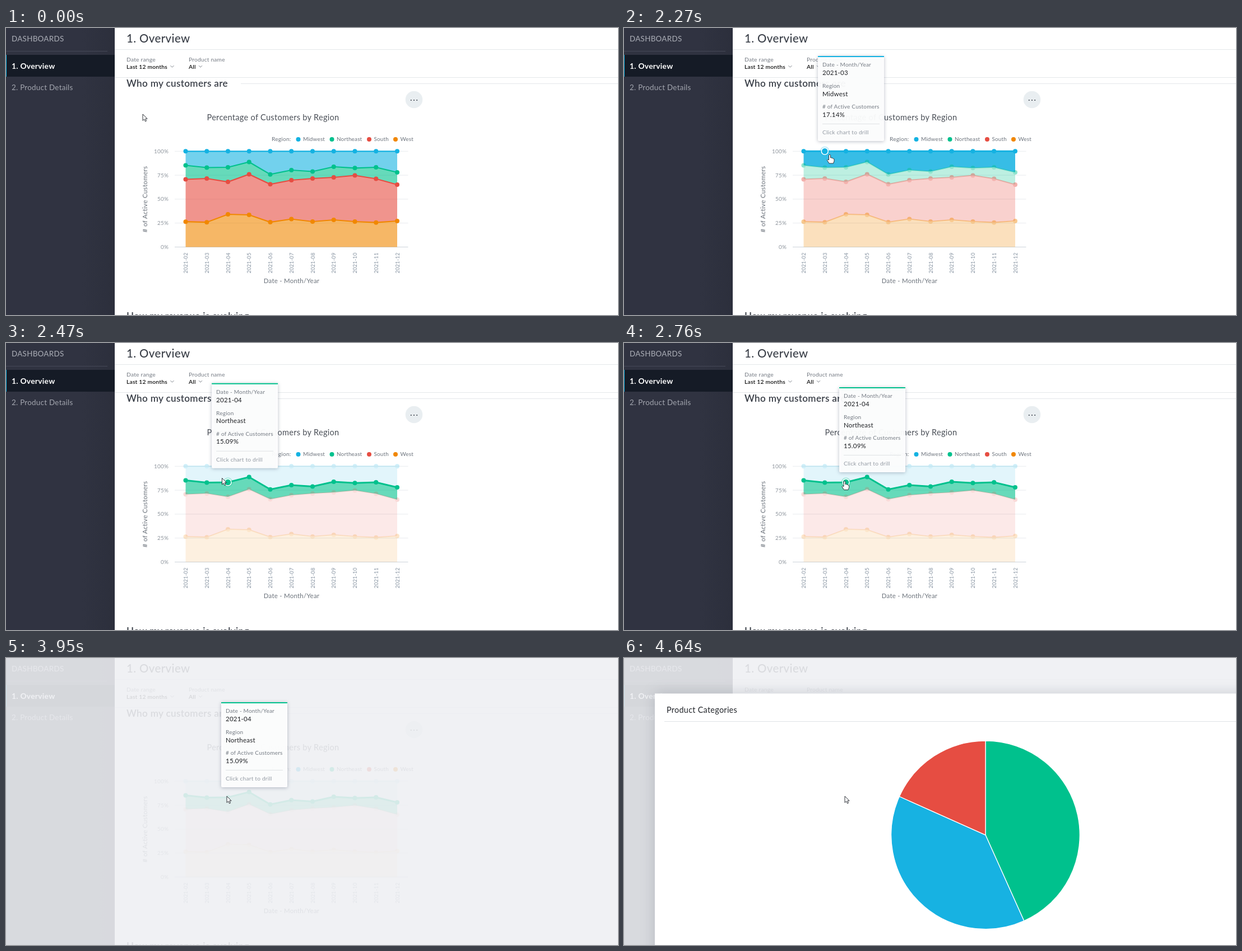
An HTML page that plays this animation: 1092x513 px, repeating every 6710 ms.

```html
<!DOCTYPE html>
<html lang="en">
<head>
<meta charset="utf-8">
<title>Dashboard drill-down</title>
<style>
  html, body { margin: 0; width: 100%; height: 100%; overflow: hidden; background: #fff; }
  svg { display: block; width: 100vw; height: 100vh; }
  text { font-family: Lato, "Open Sans", sans-serif; letter-spacing: .02em; white-space: pre; }
  .mid { text-anchor: middle; }
  .end { text-anchor: end; }
  .med { font-weight: 500; }
  .semi { font-weight: 600; }
  .bold { font-weight: 700; }
  #tip rect { filter: drop-shadow(0 1px 3px rgba(50, 60, 90, .35)); }
  #dialog rect { filter: drop-shadow(0 0 12px rgba(40, 50, 70, .2)); }
</style>
</head>
<body>
<svg id="stage" viewBox="0 0 1092 513">
  <defs>
    <linearGradient id="side">
      <stop offset=".7" stop-color="#303341"/>
      <stop offset="1" stop-color="#2c2f3c"/>
    </linearGradient>
  </defs>
  <g id="page">
    <rect width="194" height="513" fill="url(#side)"/>
    <path d="M0 41.5H181" stroke="#454857"/>
    <rect y="48" width="194" height="39" fill="#151b26"/>
    <rect y="48" width="1" height="39" fill="#14b2e2"/>
    <path d="M194 38.5H1092M194 88.5H1092M419 99.5H1092" stroke="#e4e7ea"/>
    <path d="M293.5 67.2l3 3 3-3M344 67.2l3 3 3-3" fill="none" stroke="#7c828a"/>
    <circle cx="728" cy="128" r="15.3" fill="#e9eef1"/>
    <g fill="#424953">
      <circle cx="722.8" cy="129" r="1.1"/><circle cx="728" cy="129" r="1.1"/><circle cx="733.2" cy="129" r="1.1"/>
    </g>
  </g>
  <rect id="shade" width="1092" height="513" fill="#eef0f3" opacity=".885"/>
  <g id="dialog">
    <rect x="55" y="63.5" width="1100" height="500" fill="#fff"/>
    <path d="M72 113.5H1092" stroke="#dfe3e6"/>
    <g id="pie" stroke="#fff" stroke-width="1.3" stroke-linejoin="round"></g>
    <g id="shares"></g>
  </g>
  <g id="tip">
    <rect width="118" height="152" rx="2" fill="#fff" fill-opacity=".95"/>
    <path id="tipBar" d="M0 1H118" stroke-width="2"/>
    <path d="M8 121.5H110" stroke="#dfe2e5"/>
  </g>
  <circle id="click" cx="393.5" cy="247.5" r="10.5" fill="#e4ee00" fill-opacity=".62"/>
  <g id="cursor" fill="#fff" stroke="#30343a" stroke-linejoin="round">
    <path id="arrow" d="M.5 .5V12L3.2 9.5 5 13.5 7 12.6 5.2 8.7H8.6Z"/>
    <path id="hand" d="M-1.5 1.2Q0-.6 1.5 1.2V6Q3 5 4 6.6 6 5.9 6.4 7.6 8 7.2 8 9V12L6.5 16H-1L-4.6 10.2Q-4 8-1.5 10Z"/>
  </g>
</svg>
<script>
const LOOP = 6710, START = 1788, STEP = 67.5;
const NS = 'http://www.w3.org/2000/svg';
const $ = id => document.getElementById(id);

function add(parent, tag, attrs, content) {
  const node = document.createElementNS(NS, tag);
  for (const key in attrs) node.setAttribute(key, attrs[key]);
  if (content) node.textContent = content;
  return parent.appendChild(node);
}
const label = (parent, content, x, y, size, fill, cls = '', turn = 0) =>
  add(parent, 'text', {
    x, y, fill, 'font-size': size, class: cls,
    ...(turn && { transform: `rotate(${turn} ${x} ${y})` })
  }, content);
const show = (node, opacity) => {
  node.style.display = opacity > 0 ? '' : 'none';
  node.setAttribute('opacity', opacity);
};
const clamp = v => Math.max(0, Math.min(1, v));

// Page text
const page = $('page');
label(page, 'DASHBOARDS', 10, 24, 13.4, '#a3a6af', 'med');
label(page, '1. Overview', 10, 72.7, 13.8, '#fff', 'bold');
label(page, '2. Product Details', 10, 110.7, 13.4, '#a3a6af');
label(page, '1. Overview', 215, 26, 20.4, '#3a3f48', 'med');
label(page, 'Date range', 215, 59.8, 10.3, '#757b84');
label(page, 'Product name', 326, 59.8, 10.2, '#757b84');
label(page, 'Last 12 months', 215, 72.7, 10.3, '#111', 'semi');
label(page, 'All', 326, 72.7, 10.3, '#111', 'semi');
label(page, 'Who my customers are', 215, 105.3, 17.1, '#3a3f48', 'semi');
label(page, 'How my revenue is evolving', 215, 521, 17, '#3a3f48', 'semi');

// Area chart
const BASE = 391.5;
const px = i => 320.5 + i * 37.75;
const series = [
  { name: 'Midwest', color: '#14b2e2', key: 521.5, ys: Array(11).fill(220.3) },
  { name: 'Northeast', color: '#00c18d', key: 581.5,
    ys: [245.5, 249.5, 249, 239.5, 261.7, 254, 256.5, 248, 250.3, 249, 258] },
  { name: 'South', color: '#e64d42', key: 648,
    ys: [270.5, 269, 275, 261.5, 279.3, 272, 269, 267, 263.5, 269.5, 280] },
  { name: 'West', color: '#f18700', key: 695,
    ys: [346.2, 347.2, 333, 334, 347, 341.5, 346, 343, 346, 347.7, 345] }
];

label(page, 'Percentage of Customers by Region', 476.5, 165, 14.55, '#4a4f57', 'mid');
label(page, 'Region:', 474, 202.3, 10.2, '#6c737c');
label(page, 'Date - Month/Year', 509.5, 456.3, 11.5, '#6c737c', 'mid');
label(page, '# of Active Customers', 252, 306, 11.75, '#6c737c', 'mid', -90);
for (let i = 0; i < 5; i++) {
  const y = BASE - i * 42.8;
  label(page, i * 25 + '%', 290, y + 3.5, 9.9, '#8e959d', 'end');
  add(page, 'path', { d: `M301 ${y}H717.5`, stroke: i ? '#e8ebee' : '#ccd4da' });
}
for (let i = 0; i < 11; i++) {
  const month = String(i + 2).padStart(2, '0');
  label(page, '2021-' + month, px(i) + 3.6, 401.5, 9.3, '#8592a0', 'end', -90);
}

const outline = ys => ys.map((y, i) => `${px(i)} ${y}`);
series.forEach((s, n) => {
  const floor = series[n + 1] ? series[n + 1].ys : Array(11).fill(BASE);
  const top = outline(s.ys), bottom = outline(floor).reverse();
  s.group = add(page, 'g', { fill: s.color });
  s.area = add(s.group, 'path', { d: `M${top.join('L')}L${bottom.join('L')}Z` });
  s.line = add(s.group, 'path', { d: 'M' + top.join('L'), fill: 'none', stroke: s.color });
  s.ys.forEach((y, i) => add(s.group, 'circle', { cx: px(i), cy: y, r: 4 }));
  add(page, 'circle', { cx: s.key, cy: 199, r: 4, fill: s.color });
  label(page, s.name, s.key + 8.5, 202.3, 9.9, '#6c737c');
});

const halo = add(page, 'g', {});
add(halo, 'circle', { r: 8.5, 'fill-opacity': .28 });
add(halo, 'circle', { r: 6, stroke: '#fff', 'stroke-width': 1.5 });

// Tooltip
const tip = $('tip');
const tipRow = (name, y) => {
  label(tip, name, 8, y, 10.05, '#757b84');
  return label(tip, ' ', 8, y + 14.5, 11.5, '#1d1f23');
};
const tipDate = tipRow('Date - Month/Year', 19.3);
const tipRegion = tipRow('Region', 57);
const tipValue = tipRow('# of Active Customers', 94);
label(tip, 'Click chart to drill', 8, 140, 10.2, '#949ba4');

// Pie
const shares = [[43.3, '#00c18d'], [38.4, '#17b2e2'], [18.3, '#e64d42']];
const CX = 645, CY = 316.3, R = 168.3;
const polar = (turn, r) => {
  const a = turn * 2 * Math.PI;
  return [CX + r * Math.sin(a), CY - r * Math.cos(a)];
};
label($('dialog'), 'Product Categories', 76, 98, 14.4, '#24272c');
let sum = 0;
const slices = shares.map(([pct, fill]) => {
  const from = sum / 100, to = (sum += pct) / 100;
  const [x, y] = polar((from + to) / 2, 112);
  label($('shares'), pct + '%', x, y + 5, 9.3, '#fff', 'mid bold');
  return { from, to, node: add($('pie'), 'path', { fill }) };
});

function drawPie(e) {
  for (const { from, to, node } of slices) {
    const r = R * e, big = (to - from) * e > .5 ? 1 : 0;
    node.setAttribute('d', `M${CX} ${CY}L${polar(from * e, r)}A${r} ${r} 0 ${big} 1 ${polar(to * e, r)}Z`);
  }
}

// Pointer path: step, x, y
const route = [[-1, 243.5, 153.5], [0, 249.5, 156], [2, 282, 175], [5, 344, 212],
  [7, 367, 226], [10, 385, 241], [14, 393.5, 246.5]];
function pointer(k) {
  const n = route.findIndex(p => p[0] >= k);
  if (n < 0) return route[route.length - 1].slice(1);
  if (!n) return route[0].slice(1);
  const [a, b] = [route[n - 1], route[n]], f = (k - a[0]) / (b[0] - a[0]);
  return [a[1] + (b[1] - a[1]) * f, a[2] + (b[2] - a[2]) * f];
}

const DIM = .2;
function fade(n, k) {
  if (k < 6) return 1;
  if (k < 9) return n ? [.7, .43, DIM][k - 6] : 1;
  if (n === 1) return k === 9 ? .7 : 1;
  return n === 0 && k === 9 ? .5 : DIM;
}

function render(t) {
  const k = t < START ? -1 : Math.floor((t - START) / STEP);
  const hover = k < 6 ? -1 : k < 9 ? 0 : 1;
  const modal = k >= 32;

  series.forEach((s, n) => {
    s.group.setAttribute('opacity', fade(n, k));
    s.area.setAttribute('fill-opacity', n === 0 && hover === 0 ? .85 : .6);
    s.line.setAttribute('stroke-width', n === hover ? 3 : 2.2);
  });

  show(halo, hover >= 0 && !modal ? 1 : 0);
  show(tip, hover < 0 ? 0 : k < 40 ? 1 : k === 40 ? .5 : 0);
  if (hover >= 0) {
    const s = series[hover], at = hover + 1;
    halo.setAttribute('fill', s.color);
    halo.setAttribute('transform', `translate(${px(at)} ${s.ys[at]})`);
    $('tipBar').setAttribute('stroke', s.color);
    tipDate.textContent = hover ? '2021-04' : '2021-03';
    tipRegion.textContent = s.name;
    tipValue.textContent = hover ? '15.09%' : '17.14%';
    // The box closes a third of the gap across and half of it down per step
    const n = k < 14 ? Math.max(0, k - 8) : 99;
    const x = 384 - 38 * (2 / 3) ** n, y = 79 - 29 * .5 ** n;
    tip.setAttribute('transform', `translate(${x} ${y})`);
  }

  show($('shade'), modal ? .885 : 0);
  show($('dialog'), clamp((k - 33) / 3));
  const grow = clamp((k - 35.7) / 6.3);
  drawPie((1 - Math.cos(grow * Math.PI)) / 2);
  show($('pie'), grow > 0 ? 1 : 0);
  show($('shares'), grow >= 1 ? 1 : 0);

  const hand = k >= 6 && k < 9 || k > 10 && !modal;
  show($('hand'), hand ? 1 : 0);
  show($('arrow'), hand ? 0 : 1);
  show($('click'), k >= 30 && !modal ? 1 : 0);
  $('cursor').setAttribute('transform', `translate(${pointer(k)})`);
}

const begin = performance.now();
(function tick() {
  render((performance.now() - begin) % LOOP);
  requestAnimationFrame(tick);
})();
</script>
</body>
</html>
```
